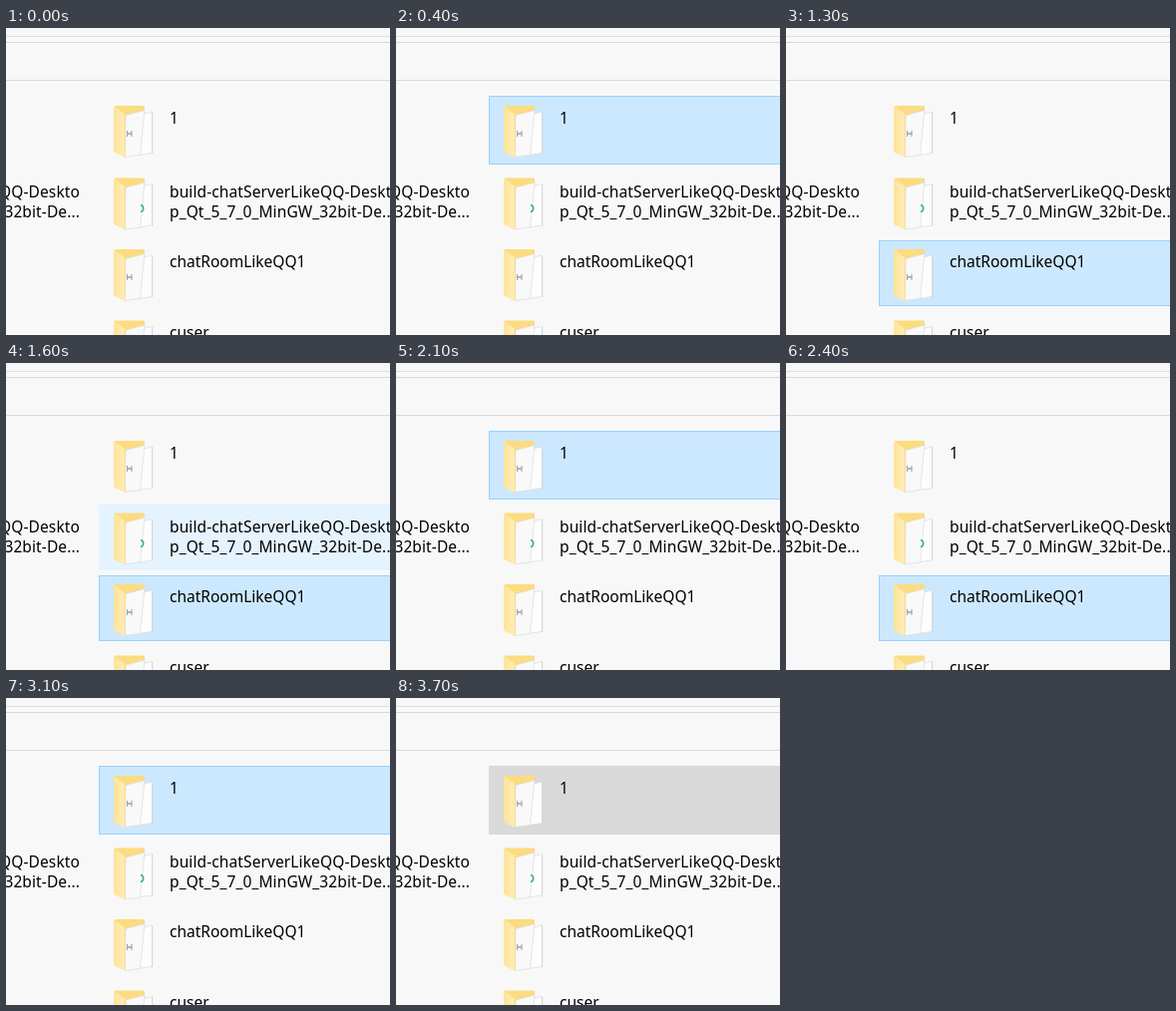
Animation of 385 by 308 pixels, one loop 3.8 s. Source, as an HTML page:

```html
<!DOCTYPE html>
<html lang="en">
<head>
<meta charset="utf-8">
<style>
  html, body { margin: 0; width: 100%; height: 100%; overflow: hidden; background: #f8f8f8; }
  svg { display: block; }
  text { font: 15.5px "Noto Sans", "Open Sans", sans-serif; fill: #000; }
  .wrapped { letter-spacing: .11px; }
  .end { text-anchor: end; }
  .idle { fill: none; }
  .hover { fill: #e5f3ff; }
  .selected { fill: #cce8ff; stroke: #99d1ff; }
  .inactive { fill: #d9d9d9; }
</style>
</head>
<body>
<svg width="385" height="308" viewBox="0 0 385 308">
  <defs>
    <linearGradient id="cover">
      <stop offset="0" stop-color="#ffe497"/>
      <stop offset="1" stop-color="#ffedb9"/>
    </linearGradient>
    <g id="folder">
      <path d="M1 .5H30L31 1.5V40H1Z" fill="#fbdc80"/>
      <g stroke="#dcdcdc" stroke-width=".7">
        <path d="M24 10L38.5 6.5V48L24 50Z" fill="#fdfdfd"/>
        <path d="M12 10L31 5L26.5 50L11 52Z" fill="#f9f9f9"/>
      </g>
      <path d="M38.7 7V48.5" stroke="#cfcfcf" stroke-width=".8"/>
      <path d="M0 2Q0 1 1 1.3L10 8Q11.3 9 11.3 11V52.5L1 47.5Q0 47 0 46Z" fill="url(#cover)"/>
      <path d="M11.3 10V52" stroke="#f3d98a" stroke-width=".7"/>
    </g>
    <g id="mark" fill="none">
      <path d="M13.5 25.5V31.5M18 25.5V31.5" stroke="#a3a69c" stroke-width="1.1"/>
      <path d="M14 28.5H18" stroke="#8fa5b8" stroke-width="1.5"/>
    </g>
    <path id="ring" d="M27 27.5A3.6 3.6 0 0 1 27 34.5" fill="none" stroke="#3bb28c" stroke-width="1.5"/>
  </defs>
  <rect width="385" height="9" fill="#f7f7f7"/>
  <path d="M0 8.5H385" stroke="#dfdfdf"/>
  <rect y="9" width="385" height="5" fill="#f9f9f9"/>
  <path d="M0 14.5H385" stroke="#d9d8d2"/>
  <path d="M0 52.5H385" stroke="#d9d9d7"/>
  <g id="list"></g>
  <text class="end wrapped" x="74" y="170">build-chatRoomLikeQQ-Deskto</text>
  <text class="end wrapped" x="74" y="190">p_Qt_5_7_0_MinGW_32bit-De...</text>
</svg>
<script>
const rows = [
  { top: 68, height: 69, icon: 77.5, base: 96, lines: ["1"] },
  { top: 142, height: 66, icon: 150, base: 170,
    lines: ["build-chatServerLikeQQ-Deskto", "p_Qt_5_7_0_MinGW_32bit-De..."] },
  { top: 213, height: 66, icon: 221.5, base: 240, lines: ["chatRoomLikeQQ1"] },
  { top: 285, height: 66, icon: 293, base: 311, lines: ["cuser"] }
];

document.getElementById("list").innerHTML = rows.map((row, i) => `
  <rect class="idle" x="93" y="${row.top}" width="300" height="${row.height}"/>
  <g transform="translate(108 ${row.icon})">
    <use href="#folder"/><use href="#${i === 1 ? "ring" : "mark"}"/>
  </g>
  ${row.lines.map((line, n) =>
    `<text class="${row.lines.length > 1 ? "wrapped" : ""}" x="164" y="${row.base + 20 * n}">${line}</text>`).join("")}
`).join("");

const boxes = document.querySelectorAll("#list rect");
const looks = { "-": "idle", h: "hover", s: "selected", i: "inactive" };

// Start time in ms and the look of the first three rows.
const steps = [
  [0, "---"], [100, "h--"], [400, "s--"], [700, "sh-"], [900, "-s-"],
  [1100, "-sh"], [1300, "--s"], [1600, "-hs"], [1800, "-s-"], [1900, "hs-"],
  [2100, "s--"], [2300, "s-h"], [2400, "--s"], [2700, "-hs"], [2800, "-s-"],
  [3000, "hs-"], [3100, "s--"], [3700, "i--"]
];

function draw() {
  const time = performance.now() % 3800;
  const state = steps.findLast(([start]) => start <= time)[1];
  [...state].forEach((key, i) => {
    const box = boxes[i];
    box.setAttribute("class", looks[key]);
    // Unbordered fills cover the same outer pixels as bordered ones.
    const inset = key === "s" ? .5 : 0;
    box.setAttribute("x", 93 + inset);
    box.setAttribute("y", rows[i].top + inset);
    box.setAttribute("height", rows[i].height - 2 * inset);
  });
  requestAnimationFrame(draw);
}
draw();
</script>
</body>
</html>
```
